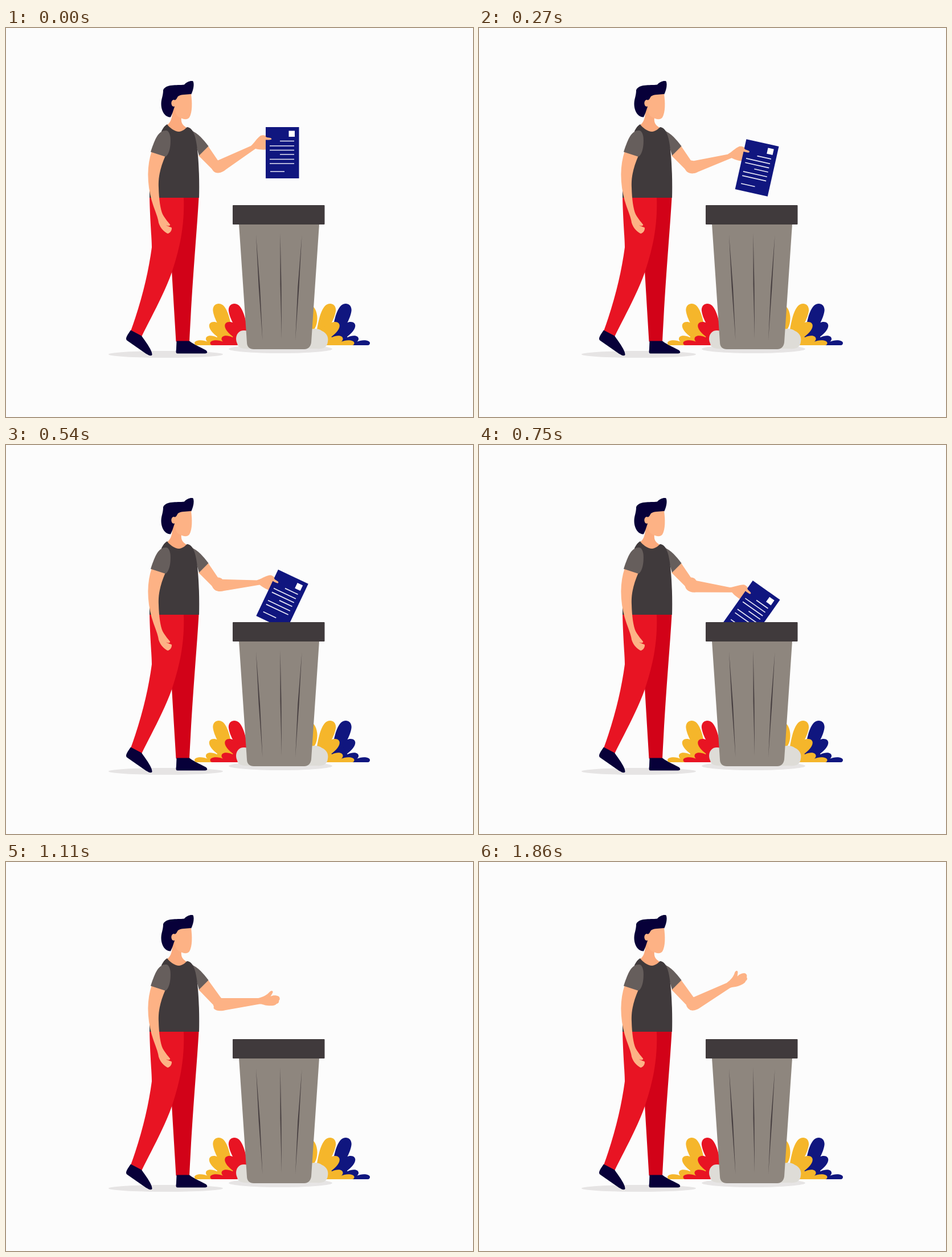
Recreate the animation shown at these times as an HTML page. Size 820 px wide and 683 px high, loop 1.89 s.

```html
<!DOCTYPE html>
<html lang="en">
<head>
<meta charset="utf-8">
<title>Paper in the bin</title>
<style>
  html, body { margin: 0; width: 100%; height: 100%; overflow: hidden; background: #fcfcfc; }
  svg { display: block; width: 100vw; height: 100vh; }
  .skin { fill: #fdb285; }
  .neck { fill: #fbaa7d; }
  .hair { fill: #070039; }
  .shirt { fill: #403a3c; }
  .sleeve { fill: #665e5c; }
  .red { fill: #e81423; }
  .darkred { fill: #d20218; }
  .yellow { fill: #f5b62b; }
  .blue { fill: #10167f; }
  .shade { fill: #e6e4e4; }
  .stone { fill: #dedcd7; }
</style>
</head>
<body>
<svg viewBox="0 0 820 683">
  <defs>
    <g id="bush">
      <path d="M398 557C382 537 366 515 363.500 497C362 485 373 481 380 486C390 493 396 517 400 557Z"/>
      <path d="M402 557C380 550 360 537 357 525C355 516 365 514 372 518C382 525 394 540 402 557Z"/>
      <path d="M402 557H372C360 556 350 551 351 545C352 539 362 539 370 543C382 548 394 553 402 557Z"/>
      <path d="M331 553C331 549 340 547 348 549C356 551 364 554 372 557H335C332 557 331 555 331 553Z"/>
      <path d="M360 557L372 541L381 525L390 520L402 540V557Z"/>
    </g>
  </defs>

  <ellipse class="shade" cx="280.500" cy="573" rx="100.500" ry="6"/>
  <ellipse class="shade" cx="482" cy="563.500" rx="91" ry="7.500"/>

  <!-- far arm holding the paper -->
  <g id="holding" class="skin">
    <path d="M338 224L354 206L373 234L376 250L366 252Z"/>
    <circle cx="372" cy="243.500" r="11"/>
    <path class="turn" d="M372 232.500L430 207C436 202 440 194 447 189C452 187 457 189 460 192V213C454 214 446 214 438 212L386 248.500C380 254 370 257 364 250Z"/>
  </g>
  <g id="paper">
    <rect class="blue" x="456" y="174" width="58.500" height="90"/>
    <rect x="496.500" y="180.500" width="10.500" height="10.500" fill="#fff"/>
    <path id="text" stroke="#e9e9f6" stroke-width="1.700" fill="none"/>
  </g>
  <path id="thumb" class="skin" d="M448 190C452 187 455 190 458 192L464.500 193C467 194 467 196 464 196.300C459 197 455 196 450 196Z"/>

  <!-- far arm with the hand open -->
  <g id="open" class="skin">
    <path d="M338 224L354 206L377.500 238.500L376 258L366 253Z"/>
    <circle cx="374.500" cy="249" r="10.800"/>
    <path class="turn" d="M378 239H443C451 237 458 234 463 228C466 225 470 226 468 230L464.500 236C469 233.500 475 234 479 236C481.500 238.500 481 242 479 243.500C480 246 478 248.500 475 249C472 253 464 252.500 459 252C453 251.500 450 249 445 249.500L386 260C378 262 368 262 364.500 256.500L366 248Z"/>
  </g>

  <!-- man -->
  <path class="sleeve" d="M326 180C338 186 346 195 355.500 207.500L339 224Z"/>
  <path class="hair" d="M276 109C281 98 299 101 313 99.500C317 95 324 92 328.500 93.500C331 99 329 109 325 117L301 140L292 150L289 156.500C279 157 272 145 272.500 132C273 123 276 119 276 109Z"/>
  <path class="neck" d="M296 138L308 157C307 165 309 170 317 175V188H285L283 170C288 167 291 160 292 150Z"/>
  <path class="skin" d="M302 120C308 116 317 117 325 116C327 130 327.500 148 322 157C318 162 311 160 307 158C300 156 297 150 296 138L295 127C299 127 300 123 302 120Z"/>
  <ellipse class="skin" cx="294.500" cy="132" rx="4.200" ry="6"/>
  <path class="darkred" d="M300 298H338.500C335 360 328 430 322 550.500H298.500L291 426Z"/>
  <path class="red" d="M252 297H312C314 350 304 390 291.500 428C277 469 254 509 238 542L219 532C238 480 250 430 256 385C256 370 253 340 252 297Z"/>
  <path class="hair" d="M219 530.500L238 540.500C246 552 257 566 256.500 574C254 577 250 574 246 572L213 549C209 546 211 542 219 530.500Z"/>
  <path class="hair" d="M299.500 549.500H322C330 556 345 562 351.500 566C355 570 353 571.500 348 571.500H301C297 571 299 567 299 562Z"/>
  <path class="shirt" d="M283 169C286 174 296 182 304 182C312 181 315 176 318 174C325 175 328 180 331 188C338 208 340 260 339 298H252V285C258 255 268 245 272 215L273 181C276 175 279 171 283 169Z"/>
  <path class="skin" d="M256 216C246 245 248 280 258 310C262 322 267 333 268 342C271 352 279 359 284 361C288 360 291 356 291 352C292 349 286 350 281 346C284 348 289 348 288 345C285 341 280 336 275 327C271 318 268.500 300 268 280C267 262 271 245 280 224Z"/>
  <path class="sleeve" d="M281 180C268 180 262 193 254 217.500L280 226C287 222 290 205 288.500 191C287 184 285 180 281 180Z"/>

  <!-- plants -->
  <use href="#bush" class="yellow"/>
  <use href="#bush" class="red" x="27.500"/>
  <g transform="matrix(-1 0 0 1 970 0)">
    <ellipse class="yellow" cx="436" cy="510" rx="12.500" ry="23"/>
    <use href="#bush" class="blue"/>
    <use href="#bush" class="yellow" x="27.500"/>
  </g>
  <path class="stone" d="M430 563C416 564 407 562 406 554C402 546 404 536 412 532C417 530 424 531 430 534Z"/>
  <path class="stone" d="M530 563H546C556 564 564 561 565 551C567 542 562 535 555 532C549 527 540 527 530 530Z"/>

  <!-- bin -->
  <path fill="#8e867e" d="M409 344H550L536 552C535 560 530 564 524 564H435C428 564 423 560 423 552Z"/>
  <path fill="#453d3f" d="M439 363L446 455L450.500 549L443.700 455ZM481.500 360L483.500 450L484 546L481.500 450ZM519.500 364L514.500 455L508 549L512.300 455Z"/>
  <rect class="shirt" x="398" y="311" width="161.500" height="34" rx="1"/>
</svg>
<script>
  const LOOP = 1890, STEP = 30, RELEASE = 780, FALL = 240;
  const HOLD_X = 367.5, OPEN_X = 374, ELBOW_Y = 245;
  const $ = id => document.getElementById(id);
  const holding = $('holding'), open = $('open'), paper = $('paper'), thumb = $('thumb');

  // [x1, x2, y] of each line on the sheet
  const lines = [[481, 506, 198.5], [463, 506, 207], [463, 506, 214.5], [481, 506, 222],
                 [463, 506, 230.5], [463, 506, 238], [464, 489, 252]];
  $('text').setAttribute('d', lines.map(([a, b, y]) => `M${a} ${y}H${b}`).join(''));

  const show = (el, on) => { el.style.display = on ? '' : 'none'; };
  const turn = (el, deg, x, dy = 0) =>
    el.setAttribute('transform', `translate(0 ${dy}) rotate(${deg} ${x} ${ELBOW_Y})`);

  function draw(t) {
    const held = t < RELEASE;
    const down = Math.min(t, RELEASE - STEP) * 0.047;
    const up = (1110 - t) * 0.031;
    const drop = Math.max(0, (t - RELEASE + STEP) / FALL);

    show(holding, held);
    show(thumb, held);
    show(open, !held);
    show(paper, drop < 1);
    turn(holding.querySelector('.turn'), down, HOLD_X);
    turn(thumb, down, HOLD_X);
    turn(paper, down, HOLD_X, 85 * drop * drop);
    turn(open.querySelector('.turn'), up, OPEN_X);
  }

  const start = performance.now();
  function tick() {
    const t = (performance.now() - start) % LOOP;
    draw(Math.floor(t / STEP) * STEP);
    requestAnimationFrame(tick);
  }
  tick();
</script>
</body>
</html>
```
